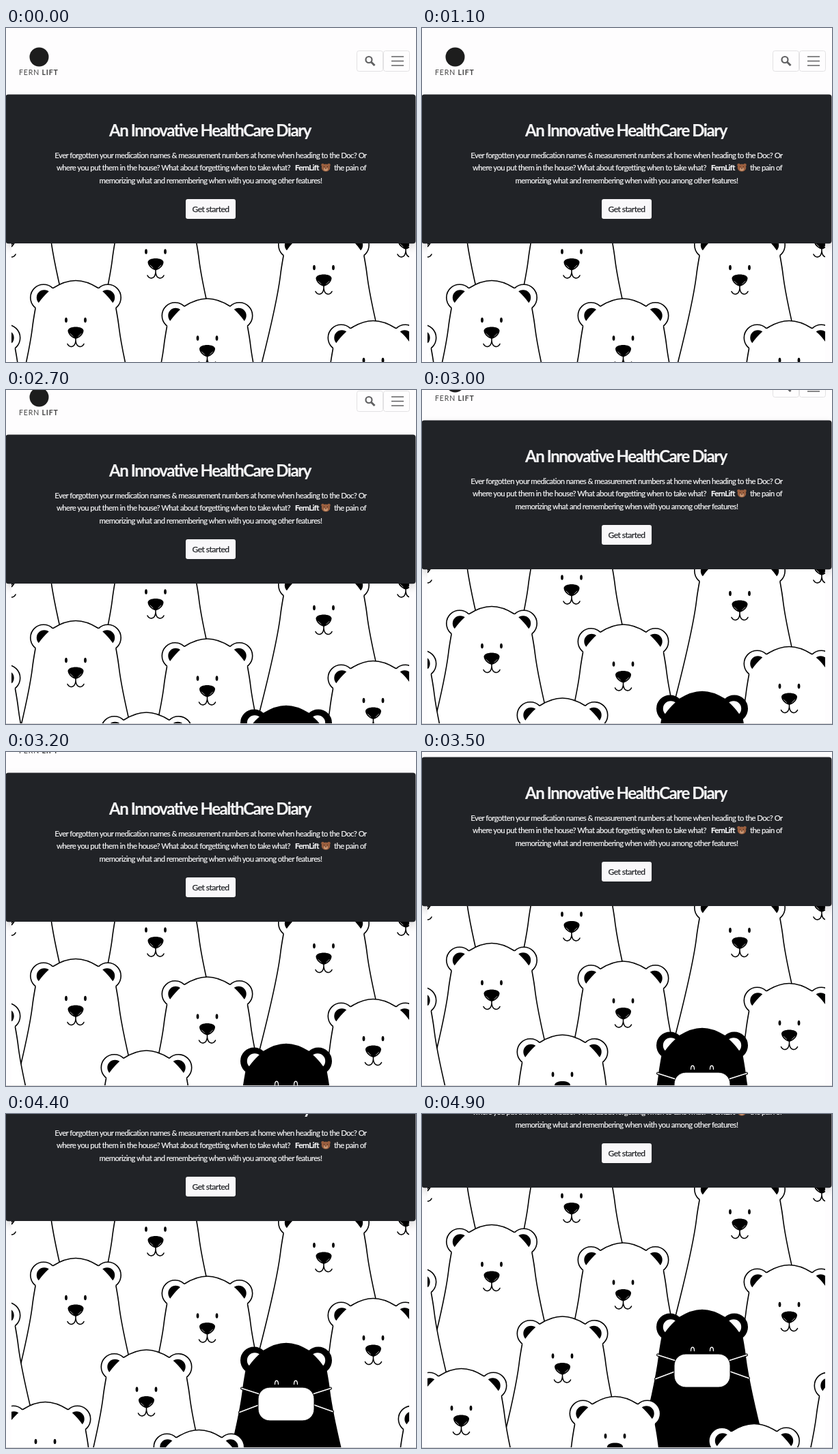
Recreate the animation shown at these times as an HTML page. Size 600 by 490 pixels, loop 5 s.

```html
<!DOCTYPE html>
<html lang="en">
<head>
<meta charset="utf-8">
<title>Health diary</title>
<style>
  html, body { margin: 0; width: 100%; height: 100%; overflow: hidden; background: #fefdfe; }
  svg { display: block; width: 600px; height: 490px; font: 11.3px Lato, sans-serif; }
  .copy { fill: #f6f6f7; stroke: #f6f6f7; stroke-width: .2; letter-spacing: -.55px; }
  .title { font-size: 24px; font-weight: 700; letter-spacing: -1.45px; }
  .mid { text-anchor: middle; }
  .bold { font-weight: 700; }
  .logo { font-size: 10.5px; letter-spacing: .85px; fill: #444; }
  .button { font-size: 12px; letter-spacing: -.5px; fill: #212327; stroke: #212327; stroke-width: .25; }
  .panel { fill: #212327; filter: drop-shadow(0 5px 6px rgba(0, 0, 0, .15)); }
  .box { fill: none; stroke: #e2e1e3; }
  .line { fill: none; stroke: #000; stroke-width: 1.6; stroke-linecap: round; }
  .thin { fill: none; stroke: #fff; stroke-linecap: round; }
</style>
</head>
<body>
<svg viewBox="0 0 600 490">
  <defs>
    <clipPath id="frame"><rect x="8" y="316" width="582" height="400"/></clipPath>
    <path id="side" d="M59 41C61 52 62.5 61 63.5 70C66 90 76 140 93 207L122 320"/>
    <g id="ear">
      <circle cx="47" cy="25" r="19.2" stroke="#000" stroke-width="1.6"/>
      <circle cx="46" cy="25" r="11.2" style="fill:var(--inner)"/>
    </g>
    <g id="body">
      <use href="#ear"/>
      <use href="#ear" transform="scale(-1 1)"/>
      <path d="M0 0C10 0 22 4 33 11C42 17 53 29 59 41C61 52 62.5 61 63.5 70C66 90 76 140 93 207L122 320
        H-122L-93 207C-76 140 -66 90 -63.5 70C-62.5 61 -61 52 -59 41C-53 29 -42 17 -33 11C-22 4 -10 0 0 0"/>
      <path class="line" d="M-33 11C-22 4 -10 0 0 0C10 0 22 4 33 11"/>
      <use href="#side" class="line"/>
      <use href="#side" class="line" transform="scale(-1 1)"/>
    </g>
    <g id="face">
      <ellipse cx="-14" cy="58" rx="1.9" ry="3.8"/>
      <ellipse cx="14" cy="58" rx="1.9" ry="3.8"/>
      <path d="M-11.5 74C-12 66 12 66 11.5 74C11 80 4 85 0 85.5C-4 85 -11 80 -11.5 74"/>
      <path class="thin" stroke-width=".7" d="M-8 78L-4 82M8 78L4 82"/>
      <path class="line" d="M0 85V89M-12 93C-9 99 -1 98.5 0 88.5C1 98.5 9 99 12 93"/>
    </g>
    <path id="strap" d="M-65 66L-40 74M65 66L40 74M-68 101L-39 90M68 100L40 90"/>
    <g id="mask">
      <path class="thin" stroke-width="1.3" d="M-16.5 60C-16.5 53 -11.5 53 -11.5 60M11.5 60C11.5 53 16.5 53 16.5 60"/>
      <use href="#strap" class="line" style="stroke-width:4"/>
      <use href="#strap" class="thin" stroke-width="1.8"/>
      <rect x="-41" y="64.5" width="82" height="49" rx="17" fill="#fff" stroke="#000"/>
    </g>
  </defs>

  <g id="page">
    <circle cx="48.5" cy="42.5" r="14" fill="#1d1d1d"/>
    <text class="logo" x="19" y="69">FERN <tspan class="bold">LIFT</tspan></text>
    <rect class="box" x="513.5" y="33.5" width="38" height="30" rx="3"/>
    <rect class="box" x="552.5" y="33.5" width="38" height="30" rx="3"/>
    <g fill="none" stroke="#606062">
      <circle cx="531" cy="46.5" r="4.5" stroke-width="2.2"/>
      <path stroke-width="3" d="M534.5 50L539.5 55"/>
      <path stroke-width="1.5" d="M564 42H582M564 48.5H582M564 55H582"/>
    </g>

    <rect class="panel" x="-.5" y="97.5" width="600" height="218.8" rx="4"/>
    <g class="copy">
      <text class="title mid" x="298.5" y="158.5">An Innovative HealthCare Diary</text>
      <text class="mid" x="299.5" y="190.5">Ever forgotten your medication names &amp; measurement numbers at home when heading to the Doc? Or</text>
      <text class="mid" x="245" y="209">where you put them in the house? What about forgetting when to take what?</text>
      <text class="bold" x="423" y="209">FernLift</text>
      <text x="480" y="209">the pain of</text>
      <text class="mid" x="299.5" y="227.5">memorizing what and remembering when with you among other features!</text>
    </g>
    <g fill="#9a5f3f">
      <circle cx="463.5" cy="201" r="2.3"/>
      <circle cx="472.5" cy="201" r="2.3"/>
      <ellipse cx="468" cy="205" rx="6.3" ry="5.6"/>
      <ellipse cx="468" cy="207.3" rx="3" ry="2.4" fill="#c99672"/>
      <path d="M465 203.5h1M470 203.5h1M467 206h2" stroke="#35211a"/>
    </g>
    <rect x="263" y="251" width="73" height="29" rx="3" fill="#f9f8fa"/>
    <text class="button mid" x="299.5" y="270">Get started</text>

    <g clip-path="url(#frame)">
      <rect y="316.3" width="600" height="400" fill="#fff"/>
      <g id="bears"></g>
    </g>
  </g>
  <path id="edge" d="M0 489.5H600" stroke="#d4d3d5"/>
</svg>
<script>
  const $ = id => document.getElementById(id);
  const TILE = 583, LOOP = 5000, STEP = 100;

  // Head-top positions, back to front; the pattern repeats sideways.
  const bears = [[585, 239], [219, 270], [465, 293.5], [102, 370.5], [294.5, 397],
    [537.5, 429.5], [410, 495.5, true], [205.5, 505], [57.5, 581.5], [282.5, 622.5], [486, 662.5]];

  const drawBear = (x, y, masked) => `<g transform="translate(${x} ${y})">
    <use href="#body" fill="${masked ? '#000' : '#fff'}" style="--inner:${masked ? '#fff' : '#000'}"/>
    <use href="#${masked ? 'mask' : 'face'}"/></g>`;

  $('bears').innerHTML = bears.map(([x, y, masked]) =>
    [x - TILE, x, x + TILE].filter(cx => cx > -75 && cx < 675)
      .map(cx => drawBear(cx, y, masked)).join('')).join('');

  // [time, scroll distance]
  const scroll = [[2200, 0], [2700, 32], [3200, 67], [3900, 120], [4400, 159], [4900, 208]];

  function scrollAt(t) {
    if (t <= scroll[0][0]) return 0;
    const i = scroll.findIndex(([time]) => time >= t);
    const [t0, y0] = scroll[i - 1], [t1, y1] = scroll[i];
    return Math.round(y0 + (y1 - y0) * (t - t0) / (t1 - t0));
  }

  function draw(now) {
    const t = Math.floor(now % LOOP / STEP) * STEP;
    $('page').setAttribute('transform', `translate(0 ${-scrollAt(t)})`);
    $('edge').style.opacity = t >= 1800 ? 1 : 0;
    requestAnimationFrame(draw);
  }
  draw(0);
</script>
</body>
</html>
```
